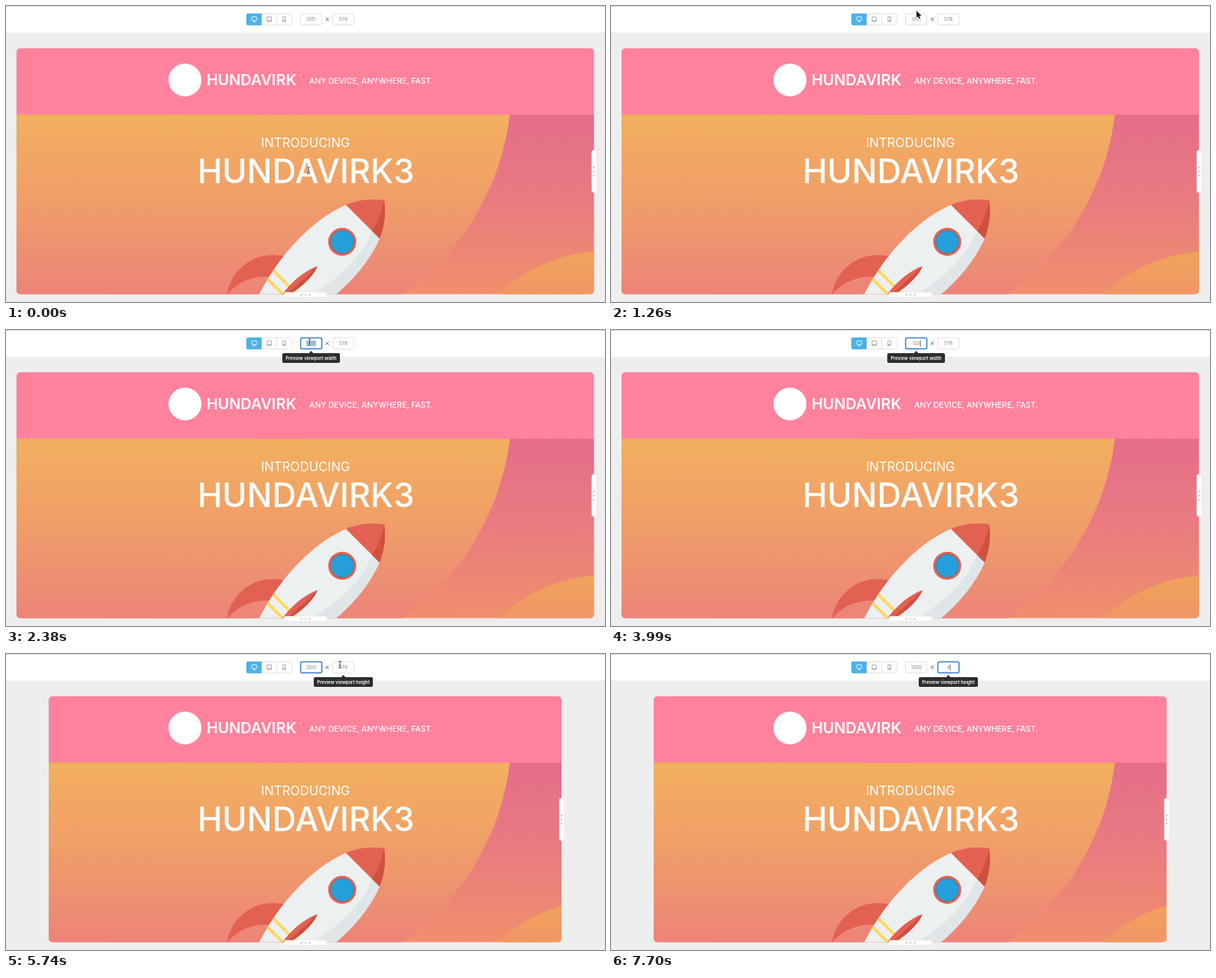
Recreate the animation shown at these times as an HTML page with a canvas. Size 800 by 396 pixels, loop 8 s.

```html
<!DOCTYPE html>
<html lang="en">
<head>
<meta charset="utf-8">
<title>Responsive preview</title>
<style>
  html, body { margin: 0; width: 100%; height: 100%; overflow: hidden; background: #eee; }
  canvas { display: block; }
</style>
</head>
<body>
<canvas id="stage" width="800" height="396"></canvas>
<script>
const ctx = document.getElementById('stage').getContext('2d');
const LOOP = 8000, STEP = 70, BLINK = 490;
const WIDTH_X = 407.5, HEIGHT_X = 450.5;
const HERO_TOP = 145.5;
const BRAND = 'HUNDAVIRK';

// Cursor routes: [time, x, y]; the pointer is hidden between routes while typing.
const routes = [
  [[0, 404, 220], [630, 404, 220], [1260, 408, 6.5], [1330, 408, 6.5], [1470, 408, 9],
   [1540, 408, 9], [1890, 406, 15], [2240, 405.5, 16], [2940, 405.5, 16]],
  [[5600, 412, 16], [5740, 446, 14], [5810, 447, 15], [5880, 447, 15],
   [6230, 449, 16], [7700, 449, 16]]
];

// Field contents by time: [time, text, selected]
const widthEdits = [[0, '1351'], [2170, '1351', true], [2940, '1'], [3080, '12'], [3990, '120'], [4200, '1200']];
const heightEdits = [[0, '578'], [6230, '578', true], [7700, '4']];

const latest = (list, t) => list.filter(item => item[0] <= t).pop();

function vertical(y0, y1, ...colors) {
  const g = ctx.createLinearGradient(0, y0, 0, y1);
  colors.forEach((c, i) => g.addColorStop(i / (colors.length - 1), c));
  return g;
}

function fill(path, color) {
  ctx.fillStyle = color;
  ctx.fill(new Path2D(path));
}

function stroke(path, color, width = 1) {
  ctx.strokeStyle = color;
  ctx.lineWidth = width;
  ctx.stroke(new Path2D(path));
}

function rect(x, y, w, h, color) {
  ctx.fillStyle = color;
  ctx.fillRect(x, y, w, h);
}

function box(x, y, w, h, r, color, border, line = 1) {
  ctx.beginPath();
  ctx.roundRect(x, y, w, h, r);
  if (color) { ctx.fillStyle = color; ctx.fill(); }
  if (border) { ctx.strokeStyle = border; ctx.lineWidth = line; ctx.stroke(); }
}

function disc(x, y, r, color) {
  ctx.beginPath();
  ctx.arc(x, y, r, 0, Math.PI * 2);
  ctx.fillStyle = color;
  ctx.fill();
}

function text(str, x, y, size, weight, color, align = 'center') {
  ctx.font = `${weight} ${size}px Inter, sans-serif`;
  ctx.textAlign = align;
  ctx.fillStyle = color;
  ctx.fillText(str, x, y);
}

function drawRocket() {
  // left fin
  fill('M295 386 C301 352 332 326 372 335 L352 362 C330 361 311 368 295 386 Z', '#e36152');
  // body, symmetric about its diagonal axis
  const body = 'M454 266 C402 289 360 342 338 386 L379 427 C423 405 476 363 499 311 Z';
  fill(body, '#ecf0f1');
  ctx.save();
  ctx.clip(new Path2D(body));
  fill('M489 301 C474 338 440 368 404 388 L404 430 L510 430 L510 301 Z', '#e0e6e8');
  stroke('M345 361 L373 389 M355 352 L391 388', '#ffd75d', 4);
  ctx.restore();
  // nose
  fill('M454 266 C470 260 487 257 505 260 C508 278 505 295 499 311 Z', '#e36152');
  fill('M505 260 C508 278 505 295 499 311 L489 301 C497 288 502 275 505 260 Z', '#cf5140');
  // window
  disc(449, 315.5, 18.7, '#e36152');
  disc(449, 315.5, 15.6, '#3287ac');
  disc(449, 315.5, 14.6, '#25a0da');
  // centre fin
  fill('M416 348 C399 354 381 369 368 387 L377 387 C393 377 410 363 416 348 Z', '#e36152');
  fill('M416 348 C403 361 387 375 373 387 L377 387 C393 377 410 363 416 348 Z', '#cd5040');
}

function drawPage(left, right) {
  ctx.save();
  ctx.beginPath();
  ctx.roundRect(left, 56.5, right - left, 329, 5);
  ctx.clip();
  rect(0, 56, 800, 90, '#ff829d');
  ctx.save();
  ctx.beginPath();
  ctx.rect(0, HERO_TOP, 800, 241);
  ctx.clip();
  const planet = vertical(145, 385, '#f2b05f', '#f09d69', '#ec8478');
  rect(0, 145, 800, 241, vertical(145, 385, '#e56d8a', '#e97c7f', '#f08f6c'));
  rect(0, 145, 331, 241, planet);
  disc(331, 104, 344.5, planet);
  disc(802, 540, 212, vertical(328, 385, '#f1a35a', '#f09766'));
  ctx.restore();
  drawRocket();
  disc(239, 99, 22, '#fff');
  text(BRAND, 268, 106.3, 20.2, 600, '#fff', 'left');
  text('ANY DEVICE, ANYWHERE, FAST.', 405, 103.5, 10.5, 500, '#fff', 'left');
  text('INTRODUCING', 400, 189, 16.9, 400, '#fff');
  text(BRAND + '3', 400.5, 237, 44.5, 500, '#fff');
  ctx.restore();
}

function drawHandles(right) {
  box(right - 3, 193, 6.5, 56.5, 2.5, '#fff', '#e6e6e6', 0.5);
  box(371, 383, 57.5, 6.2, 2.5, '#fff', '#e6e6e6', 0.5);
  for (const d of [-5.5, 0, 5.5]) {
    disc(right + 0.1, 221.5 + d, 1.1, '#b5b5b5');
    disc(400 + d, 386.5, 1.1, '#b5b5b5');
  }
}

function drawToolbar() {
  rect(0, 0, 800, 35.5, '#fff');
  rect(0, 0, 800, 1, '#dcdcdc');
  box(321.5, 10.5, 60.5, 15, 2, '#fff', '#e3e3e3');
  rect(361, 10, 1, 16, '#e3e3e3');
  box(321, 10, 20.5, 15.7, [2, 0, 0, 2], '#4ab2e9');
  box(328.3, 14.5, 6.6, 4.8, 0.5, null, '#fff', 0.8);
  stroke('M331.6 19.3 V21.2 M329.8 21.2 H333.4', '#fff', 0.8);
  box(348.7, 14.5, 5.8, 6.4, 0.4, null, '#999', 0.8);
  box(369.8, 14.5, 3.8, 6.4, 0.4, null, '#999', 0.8);
  rect(349, 19, 5.2, 0.8, '#999');
  rect(370, 19, 3.4, 0.8, '#999');
  stroke('M426.9 15.5 L431.5 20.1 M431.5 15.5 L426.9 20.1', '#666', 0.9);
}

function drawField(x, edits, t, focused) {
  const [since, value, selected] = latest(edits, t);
  box(x - 14, 10.4, 28.3, 14.8, 2, '#fff', focused ? '#3c7cca' : '#e0e0e0', focused ? 1.5 : 1);
  ctx.font = '400 6.2px Inter, sans-serif';
  const w = ctx.measureText(value).width;
  if (selected) rect(x - w / 2 - 0.3, 14, w + 0.6, 8, '#a9cdf2');
  text(value, x, 20, 6.2, 400, '#7d7d7d');
  const caretOn = Math.floor((t - since) / BLINK) % 2 === 0;
  if (focused && !selected && caretOn) rect(x + w / 2 + 0.2, 14, 0.8, 8, '#444');
}

function drawTooltip(x, label, width) {
  fill(`M${x - 3} 31.3 L${x} 28 L${x + 3} 31.3 Z`, '#2d2d2d');
  box(x - width / 2, 31, width, 13, 2, '#2d2d2d');
  text(label, x, 39.8, 6, 600, '#fff');
}

function cursorAt(t) {
  const route = routes.find(r => t >= r[0][0] && t < r[r.length - 1][0]);
  if (!route) return null;
  const i = route.findIndex(p => p[0] > t);
  const [t0, x0, y0] = route[i - 1], [t1, x1, y1] = route[i];
  const k = (t - t0) / (t1 - t0), e = k * k * (3 - 2 * k);
  return { x: x0 + (x1 - x0) * e, y: y0 + (y1 - y0) * e };
}

function drawCursor({ x, y }) {
  const overField = y > 10 && y < 25 && (Math.abs(x - WIDTH_X) < 14 || Math.abs(x - HEIGHT_X) < 14);
  const overText = (y > 198 && y < 245) || (y > 174 && y < 193);
  ctx.save();
  ctx.translate(x, y);
  if (overField || overText) {
    const beam = 'M-2 -4.5 Q0 -4.5 0 -3 Q0 -4.5 2 -4.5 M0 -3 V3 M-2 4.5 Q0 4.5 0 3 Q0 4.5 2 4.5 M-1 1 H1';
    stroke(beam, '#fff', 1.8);
    stroke(beam, '#333', 0.9);
  } else {
    const arrow = 'M0 0 V9.2 L2.1 7.2 L3.6 10.6 L5.2 9.9 L3.7 6.6 H6.6 Z';
    stroke(arrow, '#fff', 1.2);
    fill(arrow, '#111');
  }
  ctx.restore();
}

function render(time) {
  const t = Math.floor(time % LOOP / STEP) * STEP;
  const narrow = t >= 4200;
  const left = narrow ? 57 : 14, right = narrow ? 742 : 785.3;
  rect(0, 0, 800, 396, '#eee');
  drawToolbar();
  drawField(WIDTH_X, widthEdits, t, t >= 2030 && t < 6090);
  drawField(HEIGHT_X, heightEdits, t, t >= 6090);
  drawPage(left, right);
  drawHandles(right);
  if (t >= 1820 && t < 5600) drawTooltip(WIDTH_X, 'Preview viewport width', 77);
  if (t >= 5740) drawTooltip(HEIGHT_X, 'Preview viewport height', 79);
  const cursor = cursorAt(t);
  if (cursor) drawCursor(cursor);
}

const start = performance.now();
function frame() {
  render(performance.now() - start);
  requestAnimationFrame(frame);
}
frame();
</script>
</body>
</html>
```
